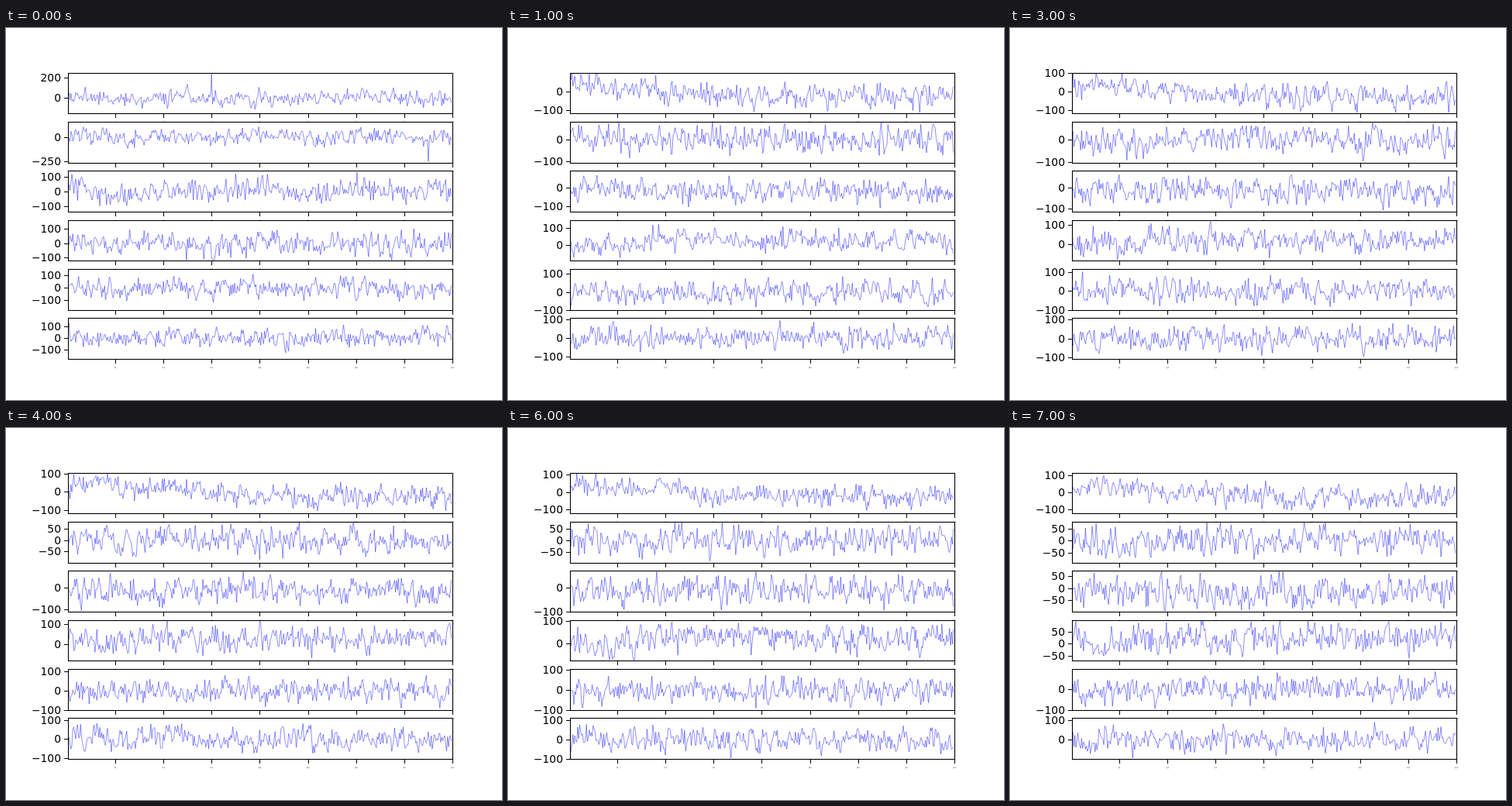
Recreate the animation shown at these times as an HTML page with a canvas. Size 640 by 480 pixels, loop 8 s.

```html
<!DOCTYPE html>
<html lang="en">
<head>
<meta charset="utf-8">
<title>Six signals</title>
<style>
  html, body { margin: 0; width: 100%; height: 100%; overflow: hidden; background: #fff; }
  canvas { display: block; }
</style>
</head>
<body>
<canvas id="stage" width="640" height="480"></canvas>
<script>
const ctx = document.getElementById('stage').getContext('2d');
const LEFT = 80, WIDTH = 496, TOP = 57.6, HEIGHT = 52.8, PITCH = 63.36;
const ROWS = 6, SAMPLES = 400, WINDOWS = 8, HOLD = 1000;

// Key axes per row: zero line below the top edge, pixels per 100 units
const opening = [[32.4, 13], [20, 12.6], [26.7, 18.7], [30.3, 18.5], [24, 16.2], [25.6, 14.8]];
const early = [[24, 24.3], [23, 28], [21.7, 23.8], [32.3, 22], [29.5, 23.2], [25.6, 24]];
const late = [[25.5, 22.3], [24.5, 30.2], [22.2, 31.7], [30.5, 31], [26, 26.5], [28, 25.2]];

const xAt = i => LEFT + (i - 1) * WIDTH / (SAMPLES - 1);
const bump = (u, center, width) => Math.exp(-(((u - center) / width) ** 2));

function axis(win, row) {
  if (win === 0) return opening[row];
  const t = (win - 1) / (WINDOWS - 2);
  return early[row].map((v, k) => v + (late[row][k] - v) * t);
}

function randomFrom(seed) {
  return () => {
    seed = seed + 0x6D2B79F5 | 0;
    let t = Math.imul(seed ^ seed >>> 15, 1 | seed);
    t = t + Math.imul(t ^ t >>> 7, 61 | t) ^ t;
    return ((t ^ t >>> 14) >>> 0) / 4294967296;
  };
}

function drift(win, row, u) {
  if (win === 0) return 15 * Math.sin(u * 26 + row * .4);
  if (row === 0) return -3 - 27 * Math.tanh((u - .33) * 7) + 15 * bump(u, .06, .05);
  if (row === 3) return 12.5 + 12.5 * Math.tanh((u - .18) * 25) + 12 * bump(u, .27, .08);
  return row === 2 ? -15 : 0;
}

function signal(win, row, low, high) {
  const random = randomFrom(win * 97 + row * 13 + 5);
  const sigma = win === 0 ? 44 : 33;
  const values = [];
  let noise = 0;
  for (let i = 0; i < SAMPLES; i++) {
    const gauss = (random() + random() + random() + random() - 2) * 1.73;
    noise = .36 * noise + .93 * gauss;
    const v = drift(win, row, i / SAMPLES) + sigma * noise;
    values.push(Math.max(low * .95, Math.min(high * .95, v)));
  }
  // Two artefacts stretch the first axes
  if (win === 0 && row === 0) values[150] = high * .95;
  if (win === 0 && row === 1) values[375] = low * .95;
  return values;
}

// Largest round step that leaves at least two ticks in view
function yTicks(low, high) {
  for (const step of [250, 200, 100, 50]) {
    const ticks = [];
    for (let v = Math.ceil(low / step) * step; v <= high; v += step) ticks.push(v);
    if (ticks.length > 1) return ticks;
  }
  return [0];
}

function label(text, x, y, size, align) {
  ctx.font = `${size}px "DejaVu Sans", sans-serif`;
  ctx.textAlign = align;
  ctx.fillText(text, x, y);
}

function drawRow(win, row) {
  const [zero, per100] = axis(win, row);
  const top = TOP + row * PITCH, bottom = top + HEIGHT;
  const yAt = v => top + zero - v * per100 / 100;
  const low = (zero - HEIGHT) * 100 / per100, high = zero * 100 / per100;
  const y0 = Math.round(top), y1 = Math.round(bottom);

  ctx.fillStyle = '#fff';
  ctx.fillRect(LEFT, y0, WIDTH, y1 - y0);

  ctx.save();
  ctx.beginPath();
  ctx.rect(LEFT, top, WIDTH, HEIGHT);
  ctx.clip();
  ctx.beginPath();
  signal(win, row, low, high).forEach((v, i) => ctx.lineTo(xAt(i), yAt(v)));
  ctx.strokeStyle = '#00f';
  ctx.lineWidth = .45;
  ctx.lineJoin = 'round';
  ctx.stroke();
  ctx.restore();

  ctx.strokeStyle = ctx.fillStyle = '#000';
  ctx.lineWidth = 1.1;
  ctx.strokeRect(LEFT + .5, y0 + .5, WIDTH, y1 - y0);

  for (let n = 50; n <= SAMPLES; n += 50) {
    ctx.fillRect(Math.round(xAt(n)), y1, 1, 6);
    label(n, xAt(n), bottom + 12, 2, 'center');
  }
  for (const v of yTicks(low, high)) {
    ctx.fillRect(75, Math.round(yAt(v)), 5, 1);
    label(String(v).replace('-', '\u2212'), 71, Math.round(yAt(v) + 5), 13.89, 'right');
  }
}

let shown = -1;
function tick() {
  const win = Math.floor(performance.now() / HOLD) % WINDOWS;
  if (win !== shown) {
    shown = win;
    ctx.fillStyle = '#fff';
    ctx.fillRect(0, 0, 640, 480);
    for (let row = 0; row < ROWS; row++) drawRow(win, row);
  }
  requestAnimationFrame(tick);
}
tick();
</script>
</body>
</html>
```
